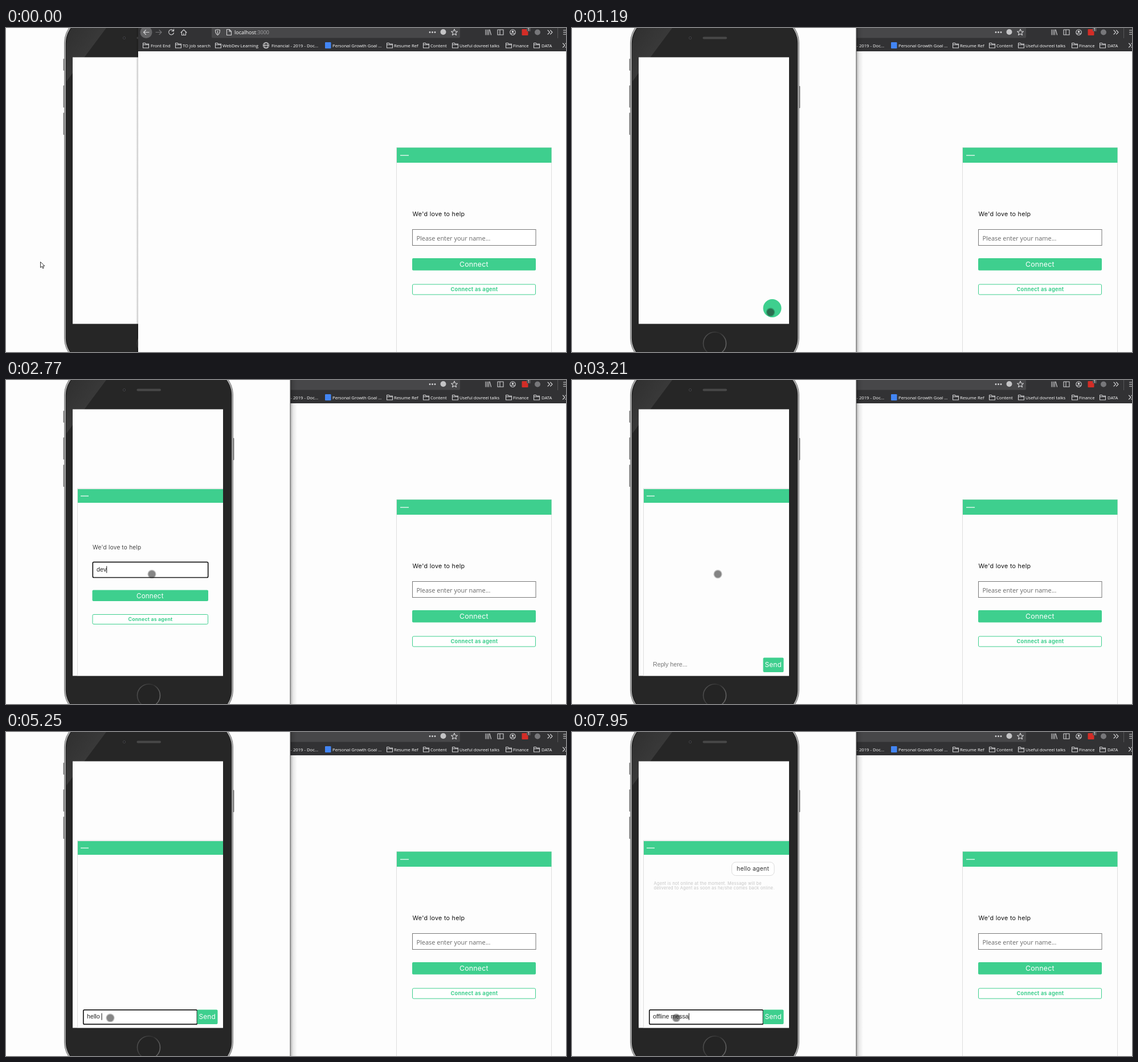
An HTML page for the animation above (8000 ms loop, 983 px wide and 570 px high).

```html
<!DOCTYPE html>
<html lang="en">
<head>
<meta charset="utf-8">
<title>Support chat demo</title>
<style>
html, body { margin: 0; width: 100%; height: 100%; overflow: hidden; background: #fdfdfd }
svg { display: block; position: absolute; left: 0; top: 0 }
text { white-space: pre }
.mont { font-family: Inter, sans-serif }
.seg { font-family: "Open Sans", sans-serif }
.arial { font: 10.7px "Liberation Sans", sans-serif }
.line { fill: none; stroke: #d4d4d6; stroke-width: 1.1; stroke-linecap: round; stroke-linejoin: round }
</style>
</head>
<body>
<svg id="stage" width="983" height="570" viewBox="0 0 983 570"></svg>
<script>
const GREEN = '#3ecf8e';
const $ = id => document.getElementById(id);
const rect = (x, y, w, h, fill, more = '') =>
  `<rect x="${x}" y="${y}" width="${w}" height="${h}" fill="${fill}" ${more}/>`;
const path = (d, more = '') => `<path class="line" d="${d}" ${more}/>`;
const label = (s, x, y, cls, size, fill, more = '') =>
  `<text x="${x}" y="${y}" class="${cls}" font-size="${size}" fill="${fill}" ${more}>${s}</text>`;
const mont = (s, x, y, size, gap, fill, weight = 400) =>
  label(s, x, y, 'mont', size, fill, `letter-spacing="${gap}" font-weight="${weight}"`);

// Chat form: heading, connect button, agent button
const form = f =>
  mont("We'd love to help", f.x + .5, f.help, f.size, .26, '#111', f.weight) +
  rect(f.x, f.y1, f.w, f.h1, GREEN, 'rx="2"') +
  mont('Connect', f.connect, f.y1 + f.h1 / 2 + 4.5, f.size * 1.15, .18, '#fff') +
  rect(f.x + .5, f.y2 + .5, f.w - 1, f.h2 - 1, '#fff', `rx="2" stroke="${GREEN}"`) +
  mont('Connect as agent', f.agent, f.y2 + f.h2 / 2 + 3.4, f.size * .865, .21, GREEN, 650);

const folder = x => path(`M${x + .5} 35V26.5H${x + 4}L${x + 5.5} 28H${x + 10.5}V35ZM${x + .5} 29.5H${x + 10.5}`, 'stroke-width=".9"');
const globe = x => `<circle class="line" cx="${x + 5.5}" cy="30.5" r="5"/><ellipse class="line" cx="${x + 5.5}" cy="30.5" rx="2.2" ry="5"/>` +
  path(`M${x + .5} 30.5H${x + 10.5}`);
const blue = x => rect(x, 25, 10.5, 11, '#4285f4', 'rx="1"');

const bookmarks = [
  [folder, 240, 254, 'Front End'], [folder, 297, 310, 'TO job search'],
  [folder, 367, 380, 'WebDev Learning'], [globe, 451, 466, 'Financial - 2019 - Doc...'],
  [blue, 560, 573, 'Personal Growth Goal ...'], [folder, 668, 681, 'Resume Ref'],
  [folder, 732, 745, 'Content'], [folder, 783, 796, 'Useful dovreel talks'],
  [folder, 877, 890, 'Finance'], [folder, 926, 940, 'DATA']
].map(([icon, x, tx, s]) => icon(x) + label(s, tx, 33.8, 'seg', 7.7, '#fff')).join('');

const toolbar =
  rect(232, 0, 751, 41, '#323234') + rect(361, -6, 436, 23.5, '#474749', 'rx="2"') +
  '<circle cx="246" cy="7.5" r="10.5" fill="#646466"/>' +
  path('M251 7.5H241.5M245.5 3.5L241.5 7.5L245.5 11.5') +
  path('M263 7.5H273M269 3.5L273 7.5L269 11.5', 'style="stroke:#737375"') +
  path('M294 5A4.5 4.5 0 1 0 294.5 8.5M294.5 2V5.5H291') +
  path('M307 8L312 3L317 8M308.5 7.5V12.5H315.5V7.5M312 12.5V9.5') +
  path('M367.5 3.5Q371.5 3 371.5 2.5Q371.5 3 375.5 3.5Q375.5 10 371.5 12.5Q367.5 10 367.5 3.5M371.5 5V10') +
  path('M387.5 2.5H392L395.5 6V12.5H387.5ZM392 2.5V6H395.5') +
  label('localhost<tspan fill="#a4a4a6">:3000</tspan>', 401, 11, 'seg', 9.05, '#fff') +
  [744, 748.5, 753].map(x => `<circle cx="${x}" cy="7.5" r="1.4" fill="#d4d4d6"/>`).join('') +
  '<circle cx="767.5" cy="7" r="5" fill="#c4c4c6"/>' +
  path('M787 2L788.6 5.7L792.4 6L789.5 8.6L790.4 12.5L787 10.4L783.6 12.5L784.5 8.6L781.6 6L785.4 5.7Z') +
  path('M842 3V12M844.7 3V12M847.4 3V12M849 3L851.5 12', 'stroke-width="1.3"') +
  path('M863 3H873V12H863ZM867 3V12') +
  '<circle class="line" cx="889.5" cy="7.5" r="4.7"/><circle cx="889.5" cy="6.3" r="1.8" fill="#d4d4d6"/>' +
  path('M886.8 10Q889.5 8 892.2 10') +
  rect(905.5, 2, 11, 11, '#d32d27', 'rx="1"') +
  rect(914, -3, 7, 9, '#555557', 'rx="1"') + label('1', 915.5, 4.5, 'seg', 7, '#fff') +
  '<circle cx="933" cy="7.5" r="5" fill="#77777a"/>' +
  path('M951 4L954.5 7.5L951 11M955.5 4L959 7.5L955.5 11') +
  rect(968, 0, 1, 18, '#58585a') +
  path('M978.5 4H986M978.5 7.5H986M978.5 11H986') +
  path('M977.5 27L981 30.5L977.5 34M982 27L985.5 30.5L982 34') + bookmarks;

const webPage = toolbar +
  rect(685.5, 210.5, 272, 380, '#fdfdfd', 'stroke="#dedede"') +
  rect(686, 210.5, 271.5, 26.5, GREEN) + rect(692, 223.5, 15, 1.2, '#fff') +
  rect(713.5, 354.5, 216.5, 28, '#fff', 'stroke="#777"') +
  label('Please enter your name...', 720.5, 373.5, 'seg', 10.95, '#666') +
  form({ x: 713, w: 217, help: 331, size: 10.75, weight: 430, y1: 405, h1: 21.5, connect: 796, y2: 450.5, h2: 19, agent: 780.5 });

const sideKey = (x, y, h) => rect(x, y, 3, h, '#7d7d7d', 'rx="1"');
const phone =
  rect(0, 0, 499, 570, '#fdfdfd') +
  sideKey(100.5, 54, 21) + sideKey(100.5, 101, 39) + sideKey(100.5, 149, 39) + sideKey(397.5, 102, 39) +
  rect(102.5, -20, 296, 612, '#b0b0b0', 'rx="46" stroke="#7c7c7c"') +
  rect(105.3, -17.2, 290.4, 606.4, '#262626', 'rx="43.5" stroke="#171717"') +
  '<path d="M106 30Q108 -14 150 -15H187L106 94Z" fill="url(#glare)"/>' +
  '<circle cx="207.5" cy="17.5" r="2" fill="#1a1a1f" stroke="#4a4a4a"/>' +
  rect(229.5, 15.5, 42.5, 4, '#484848', 'rx="2"') +
  '<circle cx="250.5" cy="555" r="20" fill="#242424" stroke="url(#ring)" stroke-width="1.5"/>' +
  rect(117, 51.5, 264, 469, '#fdfdfd');

const panel =
  rect(125, 191, 256, 329.5, '#fdfdfd') + rect(125, 190.5, 256, 1, '#dcdcdc') +
  rect(125, 191, 1, 329.5, '#dedede') +
  rect(126, 192, 255, 24, GREEN) + rect(131, 203.5, 14, 1.2, '#fff');

const focusBox = (x, y, w, h, id) => rect(x, y, w, h, '#fff', `id="${id}" rx="2" stroke="#1b1b1b" stroke-width="1.7"`);

$('stage').innerHTML = `
<defs>
  <clipPath id="cut"><rect id="cutBox" width="499" height="570"/></clipPath>
  <clipPath id="screen"><rect x="117" y="51.5" width="264" height="469"/></clipPath>
  <linearGradient id="glare" x2="1" y2="1"><stop stop-color="#2e2e2e"/><stop offset=".55" stop-color="#3a3a3a"/></linearGradient>
  <linearGradient id="ring" y1=".3" x2="1" y2=".7"><stop stop-color="#505050"/><stop offset=".5" stop-color="#2e2e2e"/><stop offset="1" stop-color="#6c6c6c"/></linearGradient>
  <linearGradient id="fade"><stop stop-opacity=".3"/><stop offset=".4" stop-opacity=".09"/><stop offset="1" stop-opacity="0"/></linearGradient>
  <linearGradient id="fadeL"><stop stop-opacity="0"/><stop offset="1" stop-opacity=".22"/></linearGradient>
</defs>
${webPage}
<g clip-path="url(#cut)">
  ${phone}
  <g clip-path="url(#screen)">
    <circle id="bubble" cx="351.5" cy="493" r="16" fill="${GREEN}"/>
    <g id="panel">${panel}
      <g id="login">
        ${form({ x: 151.5, w: 203.5, help: 297.5, size: 10.1, weight: 300, y1: 369.5, h1: 19.5, connect: 229, y2: 412, h2: 18, agent: 214.5 })}
        ${focusBox(152.3, 320.3, 202.4, 27.2, 'nameBox')}
      </g>
      <g id="chat">
        ${focusBox(135.8, 488.8, 199.7, 25.4, 'replyBox')}
        ${rect(335.5, 488.5, 36, 25.5, GREEN, 'rx="2"')}
        ${mont('Send', 338.5, 505.3, 11.8, .2, '#fff')}
        <g id="sent">
          ${rect(280.5, 229, 74.5, 23.5, '#fff', 'rx="7" stroke="#dcdcdc"')}
          ${mont('hello agent', 289, 244.3, 10.4, .27, '#333')}
          ${mont('Agent is not online at the moment. Message will be', 143.5, 269, 7.5, .18, '#c6c6c6')}
          ${mont('delivered to Agent as soon as he/she comes back online.', 143.5, 277, 7.5, .18, '#c6c6c6')}
        </g>
      </g>
      <text id="field" class="arial"></text>
      <rect id="caret" width="1" height="12" fill="#111"/>
    </g>
  </g>
  <g id="touch"><circle r="7.7" fill="#000" fill-opacity=".22"/><circle r="6.3" fill="#222" fill-opacity=".4"/></g>
  <path id="arrow" d="M.5 .5V10.5L3 8.3L4.7 12L6.3 11.2L4.7 7.7H8Z" fill="#fff" stroke="#222" stroke-width=".9"/>
</g>
<rect id="shadeL" x="228" width="4" height="570" fill="url(#fadeL)"/>
<g id="shade"><rect x="499" width="12" height="570" fill="url(#fade)"/><rect x="498.5" width="1" height="570" fill="#555"/></g>`;

// Each list holds [start time, ...values]; the latest started entry applies.
const at = (list, t) => list.filter(e => e[0] <= t).pop();

const pointer = [
  [0, 'arrow', 60, 411], [120, ''], [590, 'arrow', 86, 407],
  [710, 'touch', 140, 430], [830, 'touch', 218, 466], [950, 'touch', 290, 493],
  [1070, 'touch', 336, 503], [1190, 'touch', 348.5, 500], [1490, 'touch', 296, 412],
  [1610, 'touch', 258, 343], [1750, 'touch', 256, 341.5], [3760, 'touch', 208, 425],
  [3880, 'touch', 178, 474], [4030, 'touch', 182, 498], [4150, 'touch', 183, 503]
];
const ASK = 'Please enter your name...', REPLY = 'Reply here...';
// [time, typed text, placeholder, caret shown]
const typing = [
  [0, '', ASK, 1], [1870, '', ASK, 0], [2470, '', ASK, 1], [2620, 'de', '', 1], [2770, 'dev', '', 1],
  [3210, '', REPLY, 0], [4150, '', REPLY, 1],
  ...keys('hello agent', [4730, 1, 4850, 2, 4970, 4, 5120, 5, 5250, 6, 5400, 8, 5680, 9, 5800, 10, 5950, 11]),
  [6220, '', REPLY, 1],
  ...keys('offline message', [6650, 1, 6770, 2, 6890, 3, 7040, 5, 7160, 7, 7290, 8, 7410, 9, 7560, 10, 7680, 11, 7830, 12, 7950, 13])
];
function keys(s, steps) {
  const out = [];
  for (let i = 0; i < steps.length; i += 2) out.push([steps[i], s.slice(0, steps[i + 1]), '', 1]);
  return out;
}

const show = (id, on) => $(id).style.display = on ? '' : 'none';
const set = (id, attrs) => { for (const k in attrs) $(id).setAttribute(k, attrs[k]); };

function draw(t) {
  const wide = t >= 280, chat = t >= 3210;
  set('cutBox', { width: wide ? 499 : 232 });
  show('shade', wide);
  show('shadeL', !wide);
  show('bubble', t < 1340);
  show('panel', t >= 1340);
  show('login', !chat);
  show('chat', chat);
  show('replyBox', t >= 4150);
  show('sent', t >= 6220);

  const [, kind, px, py] = at(pointer, t);
  for (const id of ['arrow', 'touch']) {
    show(id, kind === id);
    if (kind === id) set(id, { transform: `translate(${px} ${py})` });
  }

  const [, typed, hint, caret] = at(typing, t);
  const x = chat ? 142 : 159, y = chat ? 504.3 : 337;
  $('field').textContent = typed || hint;
  set('field', { x, y, fill: typed ? '#222' : '#767676' });
  show('caret', caret);
  const end = typed ? $('field').getComputedTextLength() : 0;
  set('caret', { x: x + end, y: y - 9.6 });
}

const start = performance.now();
function frame() {
  draw((performance.now() - start) % 8000);
  requestAnimationFrame(frame);
}
frame();
</script>
</body>
</html>
```
